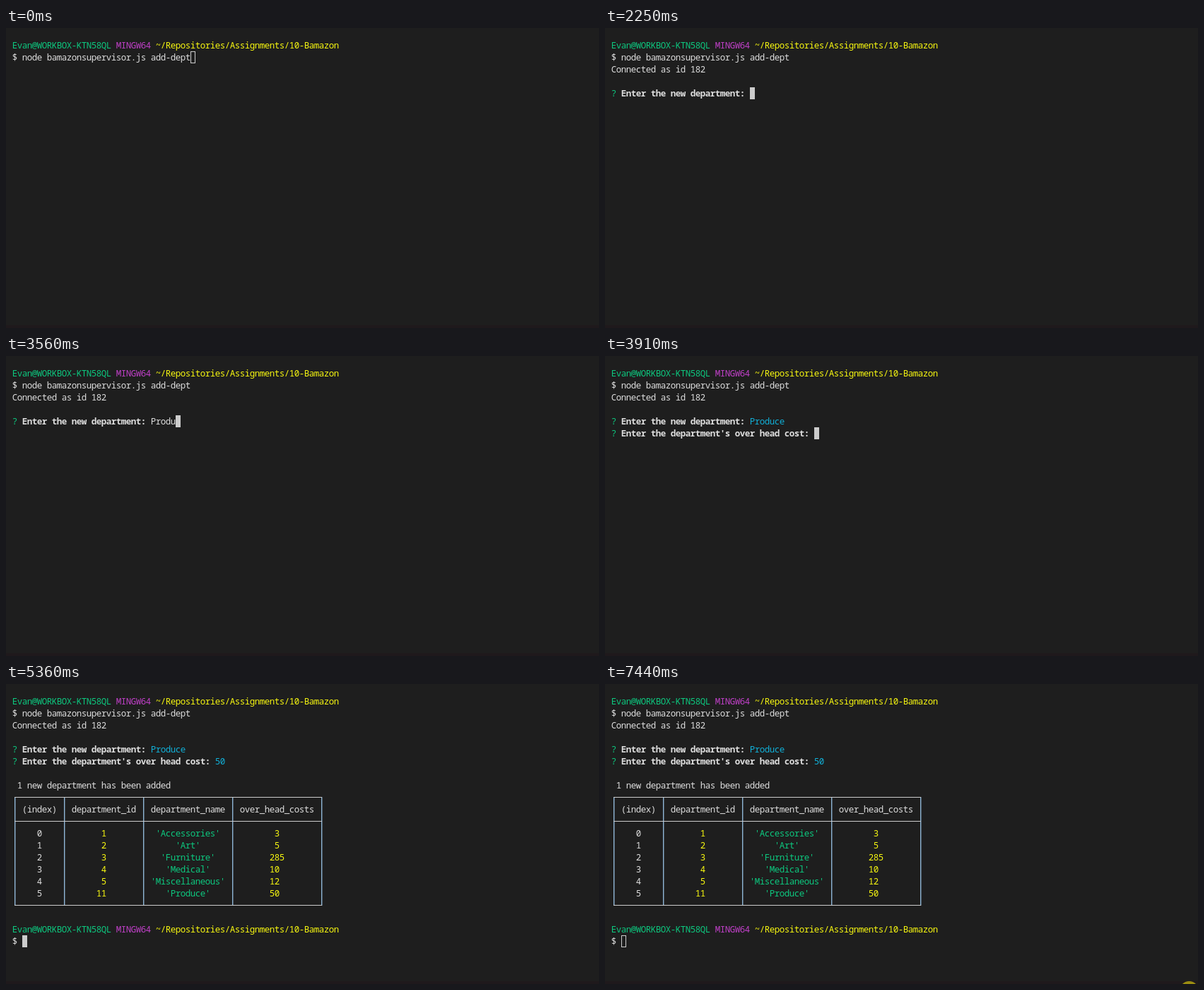
Recreate the animation shown at these times as an HTML page with a canvas. Size 839 by 425 pixels, loop 7520 ms.

```html
<!DOCTYPE html>
<html lang="en">
<head>
<meta charset="utf-8">
<title>Terminal session</title>
<style>
html, body { margin: 0; width: 100%; height: 100%; overflow: hidden; background: #1e1e1e; }
canvas { display: block; }
</style>
</head>
<body>
<canvas id="stage" width="839" height="425"></canvas>
<script>
const ctx = document.getElementById('stage').getContext('2d', { alpha: false });
const LOOP = 7520;
const CELL_W = 7, CELL_H = 17, LEFT = 9, TOP = 16;
const COLOR = {
  bg: '#1e1e1e', text: '#dedede', caret: '#cccccc', green: '#0dc87f', magenta: '#c040c8',
  yellow: '#f8f810', cyan: '#11b0d8', rule: '#8fb6d6'
};
const FONT = '12.5px "Noto Sans Mono", "DejaVu Sans Mono", monospace';
ctx.letterSpacing = '-0.5px'; // 7.5px glyphs on a 7px grid

const DEPT_KEYS = [2950, 3190, 3260, 3330, 3560, 3650, 3720];
const COST_KEYS = [4600, 4750];
const DEPT_LABEL = 'Enter the new department: ';
const COST_LABEL = "Enter the department's over head cost: ";

const HEADERS = ['(index)', 'department_id', 'department_name', 'over_head_costs'];
const COLUMN_COLORS = [COLOR.text, COLOR.yellow, COLOR.green, COLOR.yellow];
const ROWS = [
  [0, 1, "'Accessories'", 3],
  [1, 2, "'Art'", 5],
  [2, 3, "'Furniture'", 285],
  [3, 4, "'Medical'", 10],
  [4, 5, "'Miscellaneous'", 12],
  [5, 11, "'Produce'", 50]
];

const colX = col => LEFT + col * CELL_W;
const rowY = row => TOP + row * CELL_H;

function write(col, row, text, color = COLOR.text, weight = 500) {
  ctx.font = weight + ' ' + FONT;
  ctx.fillStyle = color;
  ctx.fillText(text, colX(col) - 0.25, rowY(row) + 13);
}

function caret(col, row, hollow = false) {
  const x = colX(col), y = rowY(row);
  if (hollow) {
    ctx.strokeStyle = COLOR.caret;
    ctx.lineWidth = 1;
    ctx.strokeRect(x + 0.5, y + 0.5, CELL_W - 1, CELL_H - 1);
  } else {
    ctx.fillStyle = COLOR.caret;
    ctx.fillRect(x, y, CELL_W, CELL_H);
  }
}

function prompt(row, command) {
  write(0, row, 'Evan@WORKBOX-KTN58QL', COLOR.green);
  write(21, row, 'MINGW64', COLOR.magenta);
  write(29, row, '~/Repositories/Assignments/10-Bamazon', COLOR.yellow);
  write(0, row + 1, '$ ' + command);
}

// A question whose answer is typed key by key, then turns cyan.
function question(t, row, label, answer, keys, done) {
  const typed = keys.filter(k => t >= k).length;
  const col = 2 + label.length;
  write(0, row, '?', COLOR.green);
  write(2, row, label, COLOR.text, 700);
  write(col, row, answer.slice(0, typed), t >= done ? COLOR.cyan : COLOR.text);
  if (t < done) caret(col + typed, row);
}

function table(row) {
  const edges = [0];
  for (const h of HEADERS) edges.push(edges[edges.length - 1] + h.length + 3);
  const ruleX = col => colX(col) + 3;
  const ruleY = r => rowY(r) + 8;
  const last = row + 3 + ROWS.length;
  const left = ruleX(0), right = ruleX(edges[edges.length - 1]);

  ctx.fillStyle = COLOR.rule;
  for (const e of edges) {
    ctx.fillRect(ruleX(e), ruleY(row), 1.4, ruleY(last) - ruleY(row) + 1);
  }
  ctx.fillStyle = COLOR.caret;
  for (const r of [row, row + 2, last]) {
    ctx.fillRect(left, ruleY(r), right - left + 1, 1);
  }

  const cell = (i, r, value, color) => {
    const text = String(value);
    const pad = Math.floor((HEADERS[i].length + 2 - text.length) / 2);
    write(edges[i] + 1 + pad, r, text, color);
  };
  HEADERS.forEach((h, i) => cell(i, row + 1, h, COLOR.text));
  ROWS.forEach((values, n) =>
    values.forEach((v, i) => cell(i, row + 3 + n, v, COLUMN_COLORS[i])));
}

function pointer(x, y) {
  const shape = [[0, 0], [0, 16], [4, 12.5], [6.5, 18], [9, 17], [6.5, 11.5], [11, 11.5]];
  ctx.beginPath();
  for (const [dx, dy] of shape) ctx.lineTo(x + 0.5 + dx, y + 0.5 + dy);
  ctx.closePath();
  ctx.fillStyle = '#ffffff';
  ctx.fill();
  ctx.strokeStyle = '#000000';
  ctx.lineWidth = 1;
  ctx.stroke();
}

function mouse(t) {
  if (t >= 70 && t < 150) pointer(811, 407);
  if (t >= 5680 && t < 6050) {
    const p = Math.floor((t - 5680) / 74) / 4;
    pointer(Math.round(337 + 445 * p), Math.round(195 + 194 * p));
  }
  if (t >= 7380) {
    ctx.fillStyle = '#9c8d12';
    ctx.beginPath();
    ctx.arc(826.5, 434.5, 13.5, 0, Math.PI * 2);
    ctx.fill();
  }
}

function draw(t) {
  ctx.fillStyle = COLOR.bg;
  ctx.fillRect(0, 0, 839, 425);
  ctx.fillStyle = '#1f191c';
  ctx.fillRect(0, 421, 839, 4);

  prompt(0, 'node bamazonsupervisor.js add-dept');
  if (t < 1240) caret(36, 1, t < 550);
  else if (t < 2250) caret(0, 2);
  if (t >= 2250) {
    write(0, 2, 'Connected as id 182');
    question(t, 4, DEPT_LABEL, 'Produce', DEPT_KEYS, 3910);
  }
  if (t >= 3910) question(t, 5, COST_LABEL, '50', COST_KEYS, 4970);
  if (t >= 4970 && t < 5150) caret(0, 6);
  if (t >= 5150) {
    write(1, 7, '1 new department has been added');
    table(8);
    if (t < 5360) caret(0, 18);
  }
  if (t >= 5360) {
    prompt(19, '');
    caret(2, 20, t >= 7440);
  }
  mouse(t);
}

const start = performance.now();
function tick() {
  draw((performance.now() - start) % LOOP);
  requestAnimationFrame(tick);
}
tick();
</script>
</body>
</html>
```
